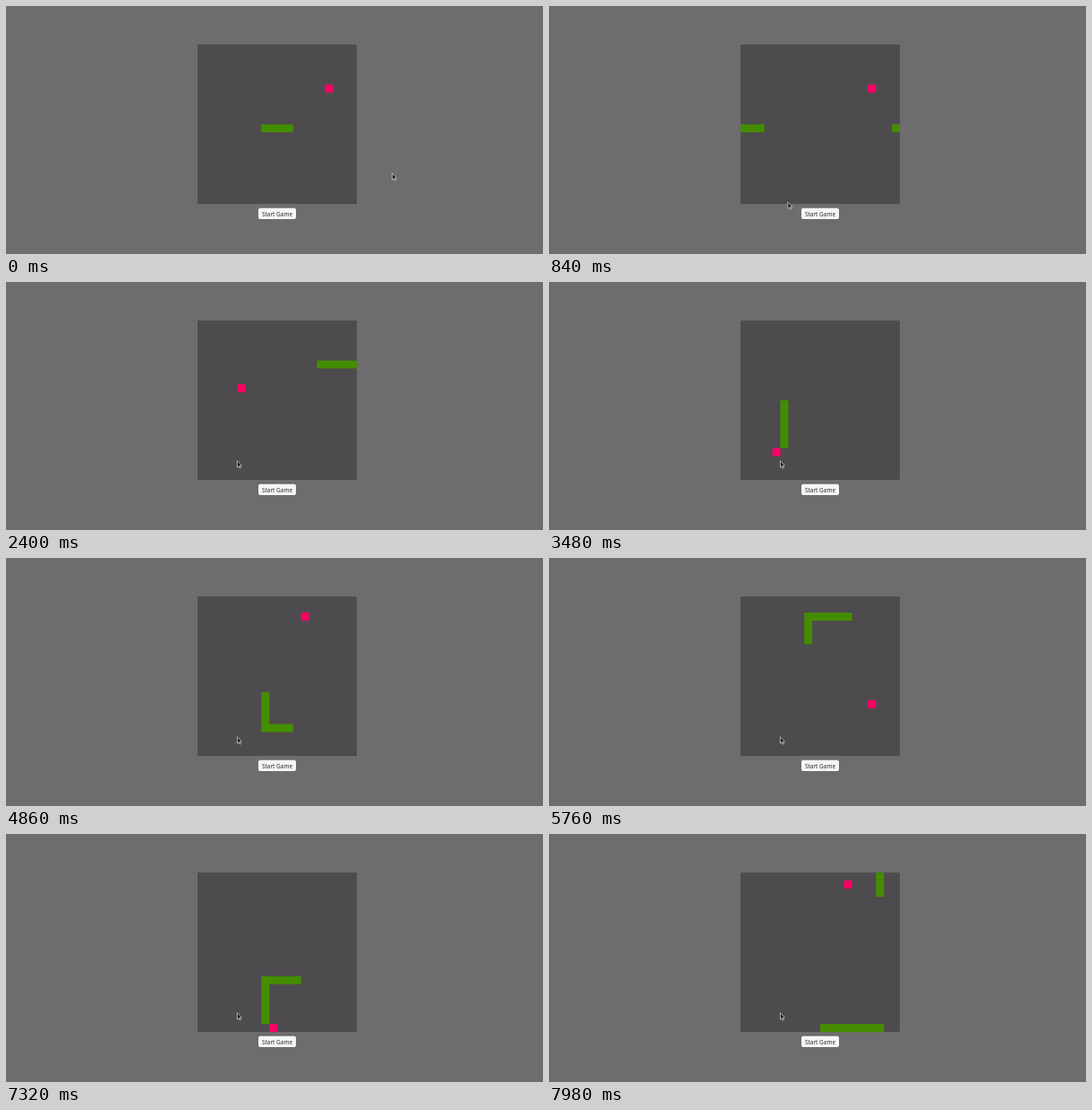
Animation of 600 by 277 pixels, one loop 8 s. Source, as an HTML page:

```html
<!DOCTYPE html>
<html lang="en">
<head>
<meta charset="utf-8">
<title>Snake</title>
<style>
  html, body { margin: 0; width: 100%; height: 100%; overflow: hidden; background: #6e6c6e; }
  svg { display: block; width: 100%; height: 100%; }
  text { font: 6.45px "Noto Sans", sans-serif; fill: #2c2c2c; text-anchor: middle; }
</style>
</head>
<body>
<svg viewBox="0 0 600 277">
  <rect x="214" y="43" width="178" height="178" fill="#4d4b4d"/>
  <g transform="translate(214 43.2) scale(8.9)">
    <path id="snake" fill="#458d00"/>
    <rect id="food" width="1" height="1" fill="#f06"/>
  </g>
  <rect x="282" y="225.8" width="42" height="12.2" rx="2" fill="#f6f5f6"/>
  <text x="303" y="234.5">Start Game</text>
  <path id="cursor" d="M0 0v7.4l1.7-1.5 1.1 2.5 1.1-.5-1.1-2.4h2.2z"
        fill="#161616" stroke="#e4e4e4" stroke-width=".7"/>
</svg>
<script>
const LOOP = 8000, TICK = 60, SIZE = 20, START_LENGTH = 4;
const STEP_DELAY = 72.5, SPEED_UP = 3.3;  // ms per step, ms gained with each meal
const DIRECTIONS = { R: [1, 0], L: [-1, 0], U: [0, -1], D: [0, 1] };
const ROUTE = 'R22 U5 R15 D11 L17 U14 R9 D11 L9 D6 R9 D3';
const MEALS = [[16, 5], [5, 8], [4, 16], [8, 13], [13, 2], [16, 13], [9, 19], [13, 1]];

const POINTER_TIME = 1080;
const POINTER_FROM = [431.6, 186.8], POINTER_BEND = [258, 257.5], POINTER_TO = [258.4, 199.7];

const snake = document.getElementById('snake');
const food = document.getElementById('food');
const cursor = document.getElementById('cursor');

const wrap = n => (n + SIZE) % SIZE;

function buildTrail() {
  const trail = [[8, 10]];
  for (const run of ROUTE.split(' ')) {
    const [dx, dy] = DIRECTIONS[run[0]];
    for (let i = 0; i < +run.slice(1); i++) {
      const [x, y] = trail[trail.length - 1];
      trail.push([wrap(x + dx), wrap(y + dy)]);
    }
  }
  return trail;
}

// Every step of the game; each meal makes the snake longer and faster
function play(trail) {
  const states = [];
  let eaten = 0, time = 0;
  for (let head = START_LENGTH - 1; head < trail.length; head++) {
    const [x, y] = trail[head], [mealX, mealY] = MEALS[eaten];
    if (x === mealX && y === mealY) eaten++;
    const tail = head + 1 - START_LENGTH - eaten;
    states.push({ time, body: trail.slice(tail, head + 1), meal: MEALS[eaten] });
    time += STEP_DELAY - SPEED_UP * eaten;
  }
  return states;
}

function pointerAt(time) {
  const u = Math.min(time / POINTER_TIME, 1), v = 1 - u;
  return POINTER_FROM.map((from, i) =>
    v * v * from + 2 * u * v * POINTER_BEND[i] + u * u * POINTER_TO[i]);
}

const states = play(buildTrail());

function draw(now) {
  const time = Math.floor(now % LOOP / TICK) * TICK;
  const { body, meal } = states.findLast(state => state.time <= time);
  snake.setAttribute('d', body.map(([x, y]) => `M${x} ${y}h1v1h-1z`).join(''));
  food.setAttribute('x', meal[0]);
  food.setAttribute('y', meal[1]);
  cursor.setAttribute('transform', `translate(${pointerAt(time)})`);
}

let start;
function frame(now) {
  start ??= now;
  draw(now - start);
  requestAnimationFrame(frame);
}
draw(0);
requestAnimationFrame(frame);
</script>
</body>
</html>
```
